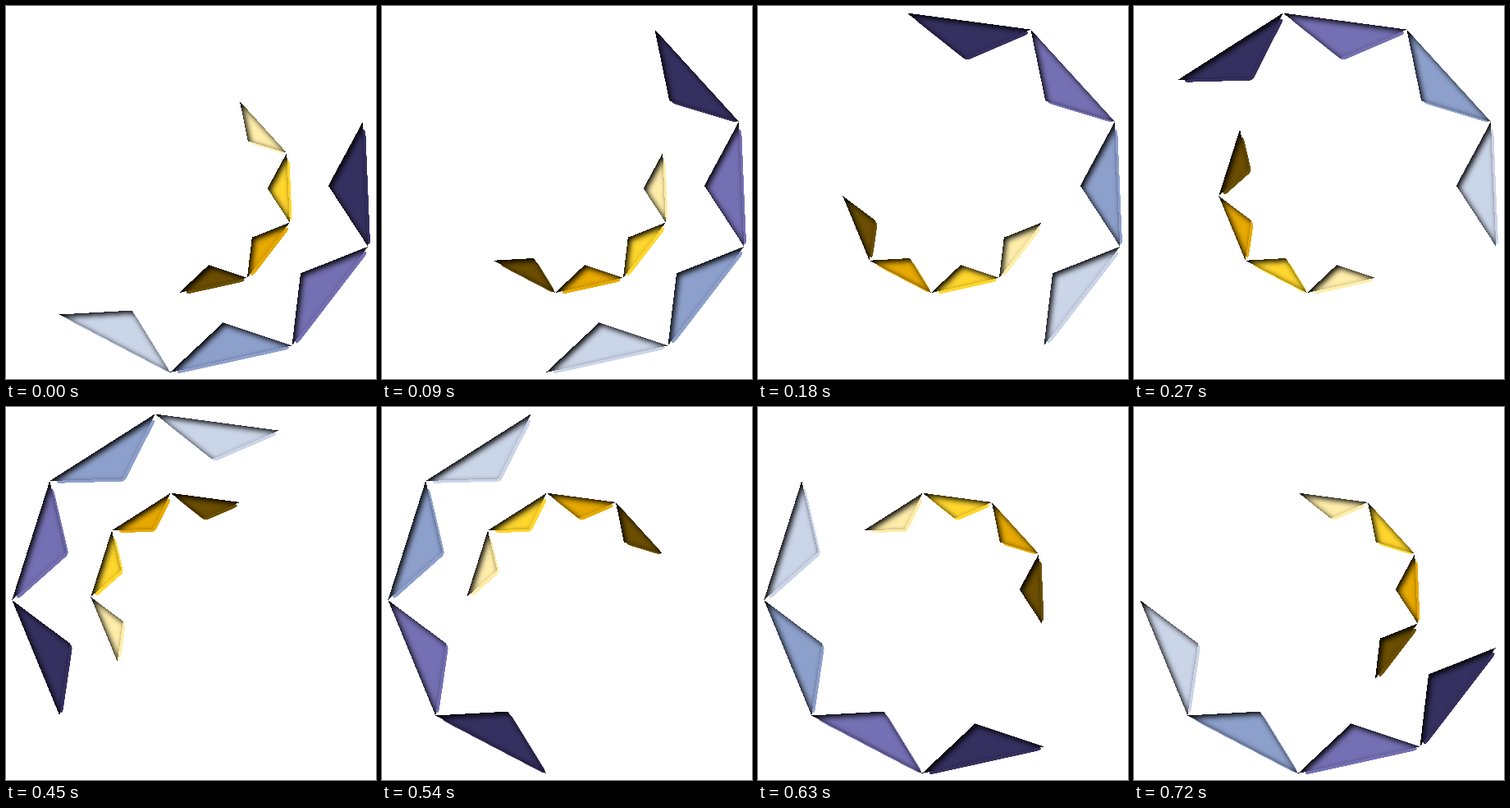
These frames come from a looping animation (451 px wide and 454 px high, 0.81 s). An HTML page:

```html
<!DOCTYPE html>
<html lang="en">
<head>
<meta charset="utf-8">
<title>Turning triangles</title>
<style>
  html, body { margin: 0; width: 100%; height: 100%; overflow: hidden; background: #fff; }
  svg { display: block; }
</style>
</head>
<body>
<svg id="stage" width="451" height="454" viewBox="0 0 451 454">
  <!-- Hard rim at the lower right, soft inner shadow from the upper left -->
  <filter id="bevel" filterUnits="userSpaceOnUse" x="-20" y="-20" width="491" height="494"
          color-interpolation-filters="sRGB">
    <feGaussianBlur in="SourceGraphic" stdDeviation="2.4"/>
    <feOffset dx="3" dy="3"/>
    <feComponentTransfer result="rim"><feFuncA type="linear" slope="20" intercept="-9.5"/></feComponentTransfer>
    <feComponentTransfer in="SourceAlpha"><feFuncA type="table" tableValues="1 0"/></feComponentTransfer>
    <feGaussianBlur stdDeviation="3.5"/>
    <feOffset dx="3" dy="3"/>
    <feComposite in2="SourceAlpha" operator="in" result="shade"/>
    <feMerge>
      <feMergeNode in="rim"/>
      <feMergeNode in="SourceGraphic"/>
      <feMergeNode in="shade"/>
    </feMerge>
  </filter>
</svg>
<script>
const SLOTS = 9, STEP_MS = 90, START_ANGLE = -102.4;
const stage = document.getElementById('stage');

// Each ring lists its colours by slot, clockwise from firstSlot.
const rings = [
  { cx: 229.4, cy: 225.6, radius: 222.3, apex: 163.6, firstSlot: 2, direction: -1,
    colors: ['#363060', '#7570b3', '#8da0cb', '#cbd5e8'] },
  { cx: 227.4, cy: 226, radius: 124.2, apex: 91.4, firstSlot: 1, direction: 1,
    colors: ['#ffeeaa', '#ffd62c', '#e7a902', '#6b4e00'] }
];

for (const ring of rings) {
  ring.pieces = ring.colors.map(color => {
    const piece = document.createElementNS('http://www.w3.org/2000/svg', 'polygon');
    piece.setAttribute('fill', color);
    piece.setAttribute('filter', 'url(#bevel)');
    piece.setAttribute('shape-rendering', 'crispEdges');
    return stage.appendChild(piece);
  });
}

function pointOn(ring, radius, slot) {
  const angle = (START_ANGLE + slot * 360 / SLOTS) * Math.PI / 180;
  return [ring.cx + radius * Math.cos(angle), ring.cy + radius * Math.sin(angle)];
}

let shownStep = -1;

function draw() {
  const step = Math.floor(performance.now() / STEP_MS) % SLOTS;
  if (step !== shownStep) {
    shownStep = step;
    for (const ring of rings) {
      ring.pieces.forEach((piece, i) => {
        const slot = ring.firstSlot + i + ring.direction * step;
        piece.setAttribute('points', [
          pointOn(ring, ring.radius, slot),
          pointOn(ring, ring.radius, slot + 1),
          pointOn(ring, ring.apex, slot + 0.5)
        ].join(' '));
      });
    }
  }
  requestAnimationFrame(draw);
}

draw();
</script>
</body>
</html>
```
